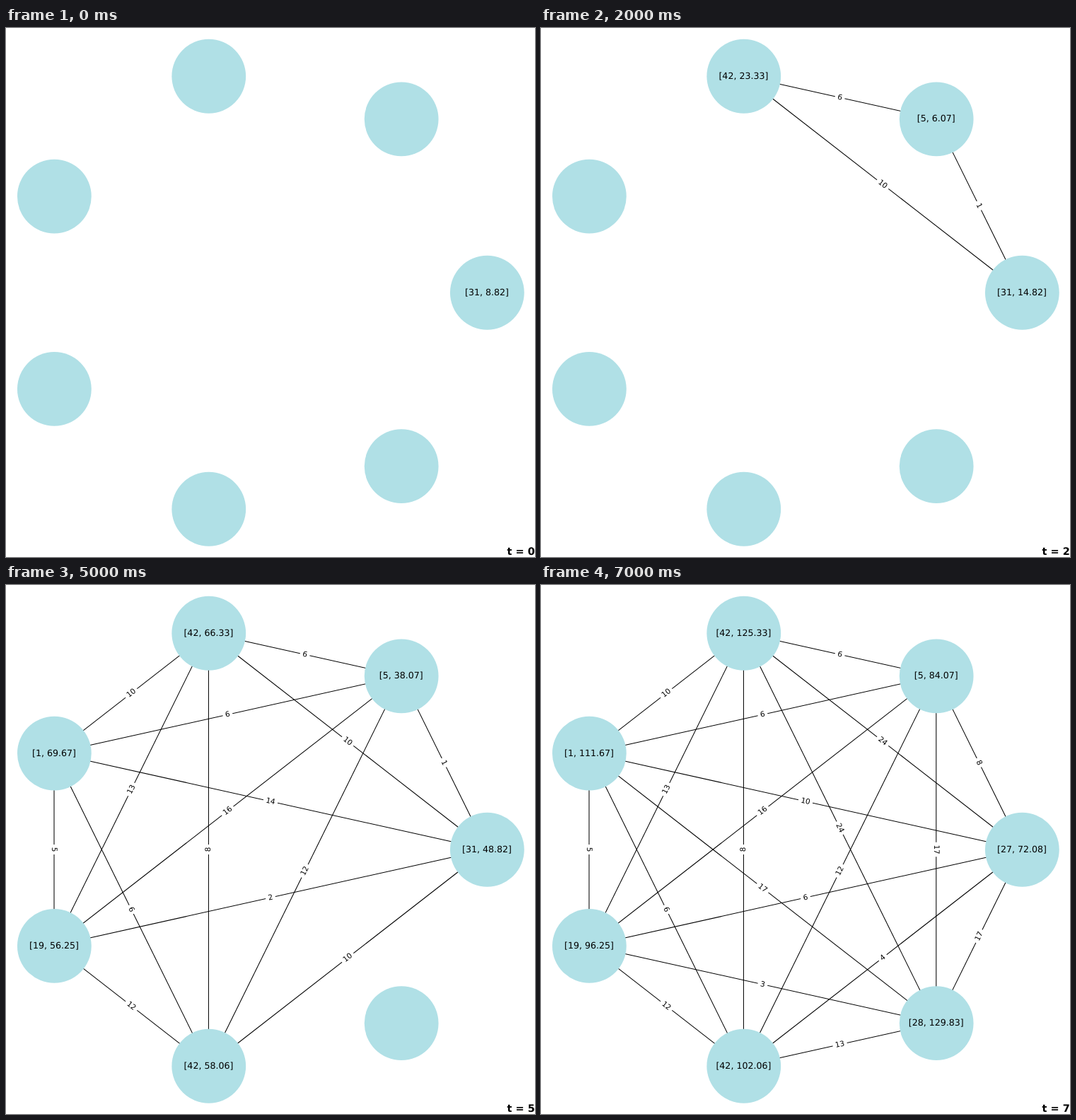
These frames come from a looping animation (748x748 px, 8 s). An HTML page:

```html
<!DOCTYPE html>
<html lang="en">
<head>
<meta charset="utf-8">
<title>Growing weighted graph</title>
<style>
  html, body { margin: 0; width: 100%; height: 100%; overflow: hidden; background: #fff; }
  svg { display: block; width: 748px; height: 748px; }
  text { font-family: "DejaVu Sans", sans-serif; text-anchor: middle; text-rendering: geometricPrecision; }
  line { stroke: #000; stroke-width: 1.04; }
  circle { fill: #b0e0e6; }
  .plate { fill: #fff; }
  .weight { font-size: 10.42px; }
  .label { font-size: 12.6px; }
  #clock { font-size: 14.5px; font-weight: bold; text-anchor: start; }
</style>
</head>
<body>
<svg viewBox="0 0 748 748">
  <g id="lines"></g>
  <g id="nodes"></g>
  <g id="weights"></g>
  <g id="labels"></g>
  <text id="clock" x="708.6" y="745"></text>
</svg>
<script>
const STEP = 1000, SLOTS = 7, RADIUS = 52.4, CENTER = 374, REACH = 306;

// One node arrives per step, linked to the others in slot order.
// The last arrival takes over slot 0.
const arrivals = [
  { id: 31, value: 8.82, links: [] },
  { id: 5, value: 3.07, links: [1] },
  { id: 42, value: 23.33, links: [10, 6] },
  { id: 1, value: 40.67, links: [14, 6, 10] },
  { id: 19, value: 38.25, links: [2, 16, 13, 5] },
  { id: 42, value: 58.06, links: [10, 12, 8, 6, 12] },
  { id: 28, value: 95.83, links: [7, 17, 24, 17, 3, 13] },
  { id: 27, value: 72.08, links: [8, 24, 10, 6, 4, 17] }
];

const $ = id => document.getElementById(id);

function add(parent, tag, attrs) {
  const el = document.createElementNS("http://www.w3.org/2000/svg", tag);
  for (const name in attrs) el.setAttribute(name, attrs[name]);
  return parent.appendChild(el);
}

// Replays the arrivals: each node grows by its total weight / e, rounded up.
function graphAt(step) {
  const nodes = [], weight = Array.from({ length: SLOTS }, () => []);
  for (let k = 0; k <= step; k++) {
    const { id, value, links } = arrivals[k], slot = k % SLOTS;
    const others = [...nodes.keys()].filter(n => n !== slot);
    others.forEach((n, i) => weight[n][slot] = weight[slot][n] = links[i]);
    for (const n of others) {
      const total = weight[n].reduce((sum, w) => sum + w, 0);
      nodes[n].value += Math.ceil(total / Math.E);
    }
    nodes[slot] = { id, value };
  }
  return { nodes, weight };
}

// Regular heptagon stretched to fill the stage.
const minCos = Math.cos(6 * Math.PI / 7), maxSin = Math.sin(4 * Math.PI / 7);
const points = Array.from({ length: SLOTS }, (_, k) => {
  const a = 2 * Math.PI * k / SLOTS;
  return {
    x: CENTER - REACH + 2 * REACH * (Math.cos(a) - minCos) / (1 - minCos),
    y: CENTER - REACH * Math.sin(a) / maxSin
  };
});

function slope(i, j) {
  const p = points[i], q = points[j];
  if (Math.abs(p.x - q.x) < 0.01) return i % 2 ? 90 : -90;
  return Math.atan((q.y - p.y) / (q.x - p.x)) * 180 / Math.PI;
}

const edges = [];
for (let i = 0; i < SLOTS; i++) {
  for (let j = i + 1; j < SLOTS; j++) {
    const p = points[i], q = points[j];
    const line = add($("lines"), "line", { x1: p.x, y1: p.y, x2: q.x, y2: q.y });
    const tag = add($("weights"), "g", {
      transform: `translate(${(p.x + q.x) / 2} ${(p.y + q.y) / 2}) rotate(${slope(i, j)})`
    });
    const plate = add(tag, "rect", { class: "plate", y: -9, height: 18, rx: 3.5 });
    const text = add(tag, "text", { class: "weight", y: 3 });
    edges.push({ i, j, line, tag, plate, text });
  }
}

const labels = points.map(({ x, y }) => {
  add($("nodes"), "circle", { cx: x + 0.35, cy: y + 0.25, r: RADIUS });
  return add($("labels"), "text", { class: "label", x, y: Math.round(y + 3.8) });
});

function show(step) {
  const { nodes, weight } = graphAt(step);
  for (const { i, j, line, tag, plate, text } of edges) {
    const value = String(weight[i][j] ?? "");
    const width = value.length * 6.63 + 7.3;
    line.style.display = tag.style.display = value ? "inline" : "none";
    plate.setAttribute("x", -width / 2);
    plate.setAttribute("width", width);
    text.textContent = value;
  }
  labels.forEach((label, k) => {
    const node = nodes[k];
    label.textContent = node ? `[${node.id}, ${node.value.toFixed(2)}]` : "";
  });
  $("clock").textContent = `t = ${step}`;
}

let current = -1;
const start = performance.now();
function tick() {
  const step = Math.floor((performance.now() - start) / STEP) % arrivals.length;
  if (step !== current) show(current = step);
  requestAnimationFrame(tick);
}
tick();
</script>
</body>
</html>
```
